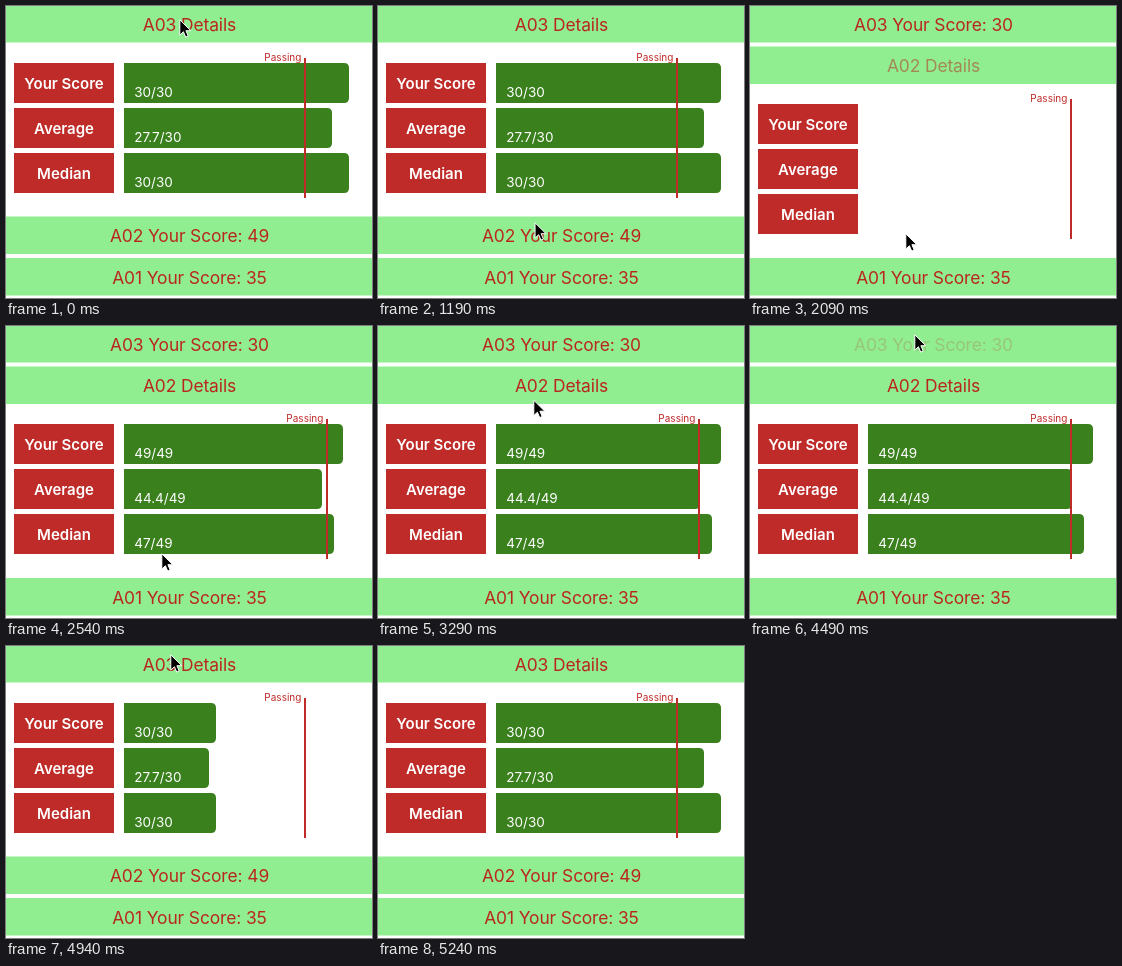
An HTML page that plays this animation: 366 by 292 pixels, repeating every 6140 ms.

```html
<!DOCTYPE html>
<html lang="en">
<head>
<meta charset="utf-8">
<title>Assignment scores</title>
<style>
  html, body { margin: 0; width: 100%; height: 100%; overflow: hidden; background: #fff; }
  svg { display: block; width: 366px; height: 292px; font-family: Inter, Roboto, sans-serif; }
  .title { font-size: 17.4px; letter-spacing: -.1px; fill: #b9261f; text-anchor: middle; }
  .label { font-size: 15px; font-weight: 600; fill: #fff; text-anchor: middle; }
  .value { font-size: 13.5px; fill: #fff; }
  .passing { font-size: 10px; fill: #be2b28; text-anchor: end; }
</style>
</head>
<body>
<svg id="stage" viewBox="0 0 366 292"></svg>
<script>
const LOOP = 6140, STEP = 150;
const RED = '#be2b28', GREEN = '#3a811e', LIGHT = '#90ee90';
const HEAD = 37.5, GAP = 4, PANEL = 170, BAR_X = 118, BAR_W = 225;
const FADE = 250, GROW = 510;

const items = [
  { name: 'A03', total: 30, pass: .8, scores: [30, 27.7, 30] },
  { name: 'A02', total: 49, pass: .9, scores: [49, 44.4, 47] },
  { name: 'A01', total: 35, pass: .8, scores: [35, 30, 31] }
];
const labels = ['Your Score', 'Average', 'Median'];

// A tap dims a title, then opens its panel and grows the bars.
const taps = [
  { item: 0, press: -2000, release: -2000, open: -2000, load: 0 },
  { item: 1, press: 1950, release: 1990, open: 2100, load: 0 },
  { item: 0, press: 4500, release: 4600, open: 4650, load: 70 }
];

const clamp = u => Math.min(1, Math.max(0, u));
const linear = u => u;
const easeIn = u => u * u;
const easeOut = u => 1 - easeIn(1 - u);
const easeInOut = u => u < .5 ? 2 * u * u : 1 - 2 * (1 - u) ** 2;

const path = [
  { t: 600, x: 173.5, y: 13.5 },
  { t: 900, x: 160.5, y: 183.5, ease: easeIn },
  { t: 1500, x: 155.5, y: 227.5, ease: easeOut },
  { t: 2970, x: 155.5, y: 227.5, ease: linear },
  { t: 3150, x: 155.5, y: 111.5, ease: easeIn },
  { t: 3450, x: 155.5, y: 36.5, ease: linear },
  { t: 3750, x: 164.5, y: 8.5, ease: easeOut }
];
const CURSOR_END = 5250;

function cursorAt(t) {
  let { x, y } = path[0];
  for (let i = 1; i < path.length; i++) {
    const a = path[i - 1], b = path[i];
    const u = b.ease(clamp((t - a.t) / (b.t - a.t)));
    x += (b.x - a.x) * u;
    y += (b.y - a.y) * u;
  }
  return [x, y];
}

function opacityAt(item, t) {
  const tap = taps.findLast(p => p.item === item && p.press <= t);
  return tap ? .2 + .8 * easeInOut(clamp((t - tap.release) / FADE)) : 1;
}

const rect = (x, y, w, h, fill) =>
  `<rect x="${x}" y="${y}" width="${w}" height="${h}" fill="${fill}"/>`;

const text = (cls, x, y, str, opacity = 1) =>
  `<text class="${cls}" x="${x}" y="${y}" opacity="${opacity}">${str}</text>`;

function header(item, y, open, opacity) {
  const str = open ? `${item.name} Details` : `${item.name} Your Score: ${item.scores[0]}`;
  return rect(0, y, 366, HEAD, LIGHT) + text('title', 183.5, y + 25.8, str, opacity);
}

function bar(y, w) {
  const r = Math.min(5, w);
  return `<path fill="${GREEN}" d="M${BAR_X} ${y}h${w - r}q${r} 0 ${r} ${r}v${40 - 2 * r}q0 ${r} ${-r} ${r}h${r - w}z"/>`;
}

function panel(item, y, grow) {
  let out = '';
  labels.forEach((label, i) => {
    const top = y + 20 + i * 45, score = item.scores[i];
    out += rect(8, top, 100, 40, RED) + text('label', 58, top + 25.5, label);
    if (grow > 0) {
      out += bar(top, Math.round(BAR_W * score / item.total * grow));
      out += text('value', 128.2, top + 33.6, `${score}/${item.total}`);
    }
  });
  const x = Math.floor(BAR_X + BAR_W * item.pass);
  return out + rect(x, y + 15, 2, 140, RED) + text('passing', x - 2.6, y + 18, 'Passing');
}

function spinner(x, y) {
  let out = '';
  for (let i = 0; i < 12; i++) {
    const opacity = Math.max(.3, 1 - i * .125);
    out += `<path d="M-9.5 0H-16" transform="rotate(${-30 * i})" opacity="${opacity}"/>`;
  }
  return `<g transform="translate(${x} ${y})" stroke="${RED}" stroke-width="3" stroke-linecap="round">${out}</g>`;
}

function cursor([x, y]) {
  return `<path transform="translate(${x} ${y})" stroke="#fff" stroke-linejoin="round"
    d="M.3 .3V15.6L3.9 12.2L6.2 17.6L8.7 16.5L6.4 11.2H11.3Z"/>`;
}

function draw(t) {
  const tap = taps.findLast(p => p.open <= t);
  const started = tap.open + tap.load;
  const grow = easeInOut(clamp((t - started) / GROW));
  let y = -1, out = rect(0, 0, 366, 292, '#fff');
  items.forEach((item, i) => {
    const open = i === tap.item;
    out += header(item, y, open, opacityAt(i, t));
    y += HEAD;
    if (open) {
      out += t < started ? spinner(182, y + 36.5) : panel(item, Math.round(y), grow);
      y += PANEL;
    }
    y += GAP;
  });
  return t < CURSOR_END ? out + cursor(cursorAt(t)) : out;
}

const stage = document.getElementById('stage');
const start = performance.now();
let last = '';

function tick() {
  const t = (performance.now() - start) % LOOP;
  const next = draw(Math.floor((t + 10) / STEP) * STEP);
  if (next !== last) stage.innerHTML = last = next;
  requestAnimationFrame(tick);
}
tick();
</script>
</body>
</html>
```
